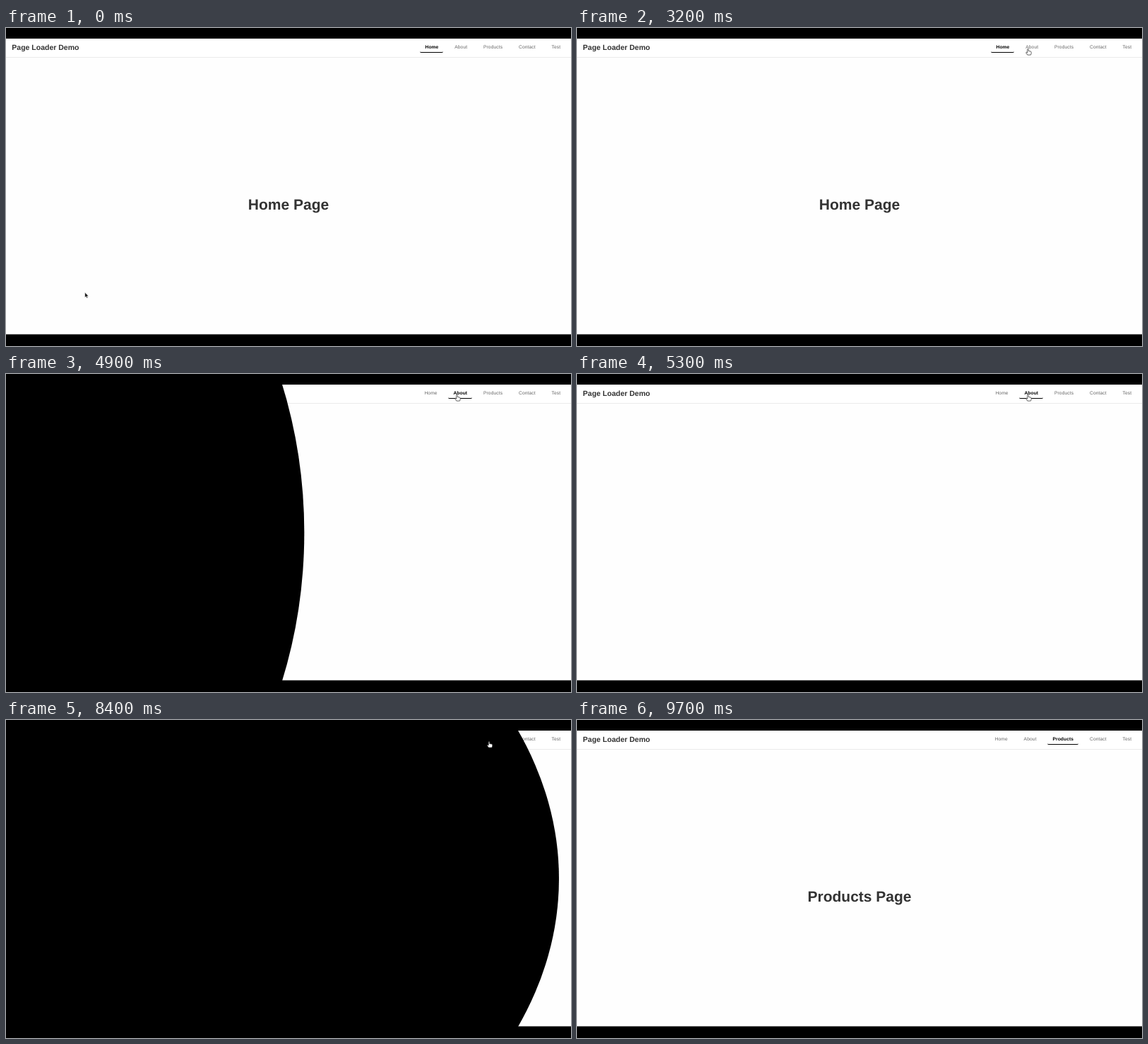
These frames come from a looping animation (800x450 px, 10000 ms). An HTML page:

```html
<!DOCTYPE html>
<html lang="en">
<head>
<meta charset="utf-8">
<title>Page Loader Demo</title>
<style>
  html, body { margin: 0; width: 100%; height: 100%; overflow: hidden; background: #000; }
  body { font-family: "Liberation Sans", Arial, sans-serif; text-rendering: geometricPrecision; }
  #stage { position: relative; width: 800px; height: 450px; overflow: hidden; }
  #page {
    position: absolute; top: 15px; width: 800px; height: 418px;
    background: #fefefe; border-bottom: 1px solid #777; color: #333;
  }
  header { height: 26px; border-bottom: 1px solid #ebebeb; background: #fff; }
  #brand { position: absolute; left: 8.3px; top: 0; line-height: 26px; font-size: 10.5px; font-weight: bold; }
  nav { position: absolute; right: 7.8px; top: 5px; display: flex; gap: 8.75px; }
  nav span {
    height: 14px; padding: 0 7px; line-height: 16px; font-size: 6.65px; letter-spacing: .13px;
    color: #666; border-bottom: 1px solid transparent; border-radius: 1.75px;
  }
  nav .active { color: #000; font-weight: bold; border-color: #000; }
  h1 { position: absolute; left: 0; right: 0; top: 220px; margin: 0; line-height: 32px; font-size: 21px; text-align: center; }
  svg { position: absolute; inset: 0; }
</style>
</head>
<body>
<div id="stage">
  <div id="page">
    <header><div id="brand">Page Loader Demo</div><nav></nav></header>
    <h1></h1>
  </div>
  <svg width="800" height="450">
    <ellipse id="wipe" cy="224.5" ry="555"/>
    <g id="spinner" fill="none" stroke="#fff" stroke-width="1.7">
      <circle r="11.7" stroke-opacity=".33"/>
      <path d="M-8.27-8.27A11.7 11.7 0 0 1 8.27-8.27"/>
    </g>
    <g id="cursor" stroke-linejoin="round">
      <path id="arrow" d="M0 0V7L1.6 5.5 2.7 8 3.9 7.5 2.8 5.1H5Z" fill="#111" stroke="#fff" stroke-width=".4"/>
      <path id="hand" d="M-.8.3a.8.8 0 0 1 1.6 0V2.5l3 .6q.9.2.9 1.2v1.4q0 1-.8 2.4H-.6L-2.8 5.1q.2-1.1 1-.8l1 .8z"
        fill="#fff" stroke="#222" stroke-width=".7"/>
    </g>
  </svg>
</div>
<script>
const LOOP = 10000, FULL_EDGE = 866;
const links = ["Home", "About", "Products", "Contact", "Test"];

// start: loader covers the page; mid/span: wipe timing; title/fade: heading entrance
const visits = [
  { start: 4000, mid: 4899.4, span: 890, title: 5720, fade: 260 },
  { start: 7600, mid: 8538, span: 1150, title: 9530, fade: 165 },
];

// time, x, y of the pointer tip
const route = [
  [0, 111.5, 374.5], [1000, 391, 228], [1100, 391, 228], [2200, 604, 98],
  [3000, 638.5, 30], [5700, 638.5, 30], [6000, 649, 30], [6100, 649, 30],
  [6600, 666, 31], [6800, 666, 31], [7000, 676, 31], [7100, 676, 31],
  [7300, 684, 31], [LOOP, 684, 31],
];

const el = id => document.getElementById(id);
const show = (node, visible) => { node.style.display = visible ? "" : "none"; };
const clamp = v => Math.max(0, Math.min(1, v));
const heading = document.querySelector("h1");
const nav = document.querySelector("nav");
const items = links.map(name => {
  const item = document.createElement("span");
  item.textContent = name;
  return nav.appendChild(item);
});

// Exponential ease-in-out, measured as the share still covered
function covered(p) {
  if (p > .4) return 0;
  return p < 0 ? 1 - .5 * 2 ** (20 * p) : .5 * 2 ** (-20 * p);
}

function pointer(t) {
  const i = route.findIndex(stop => stop[0] > t);
  const [t0, x0, y0] = route[i - 1], [t1, x1, y1] = route[i];
  const p = (t - t0) / (t1 - t0);
  return [x0 + (x1 - x0) * p, y0 + (y1 - y0) * p];
}

let shownPage = -1;
function setPage(index) {
  if (index === shownPage) return;
  shownPage = index;
  items.forEach((item, i) => item.classList.toggle("active", i === index));
  heading.textContent = links[index] + " Page";
}

function draw(t) {
  const page = visits.filter(v => t >= v.start).length;
  const visit = visits[page - 1];
  setPage(page);

  heading.style.opacity = visit ? clamp((t - visit.title) / visit.fade) : 1;
  const edge = visit ? FULL_EDGE * covered((t - visit.mid) / visit.span) : 0;
  el("wipe").setAttribute("rx", edge);
  show(el("wipe"), edge > 0);

  const glow = visit ? clamp((visit.mid - 250 - t) / 150) : 0;
  const angle = visit ? 10 + (t - visit.start) * .36 : 0;
  el("spinner").setAttribute("opacity", glow);
  el("spinner").setAttribute("transform", `translate(400 224.3) rotate(${angle})`);

  const hand = t >= 3200 && !(t >= 6500 && t < 6900);
  show(el("hand"), hand);
  show(el("arrow"), !hand);
  show(el("cursor"), t < 9600);
  el("cursor").setAttribute("transform", `translate(${pointer(t)})`);
}

const began = performance.now();
function tick() {
  draw((performance.now() - began) % LOOP);
  requestAnimationFrame(tick);
}
tick();
</script>
</body>
</html>
```
